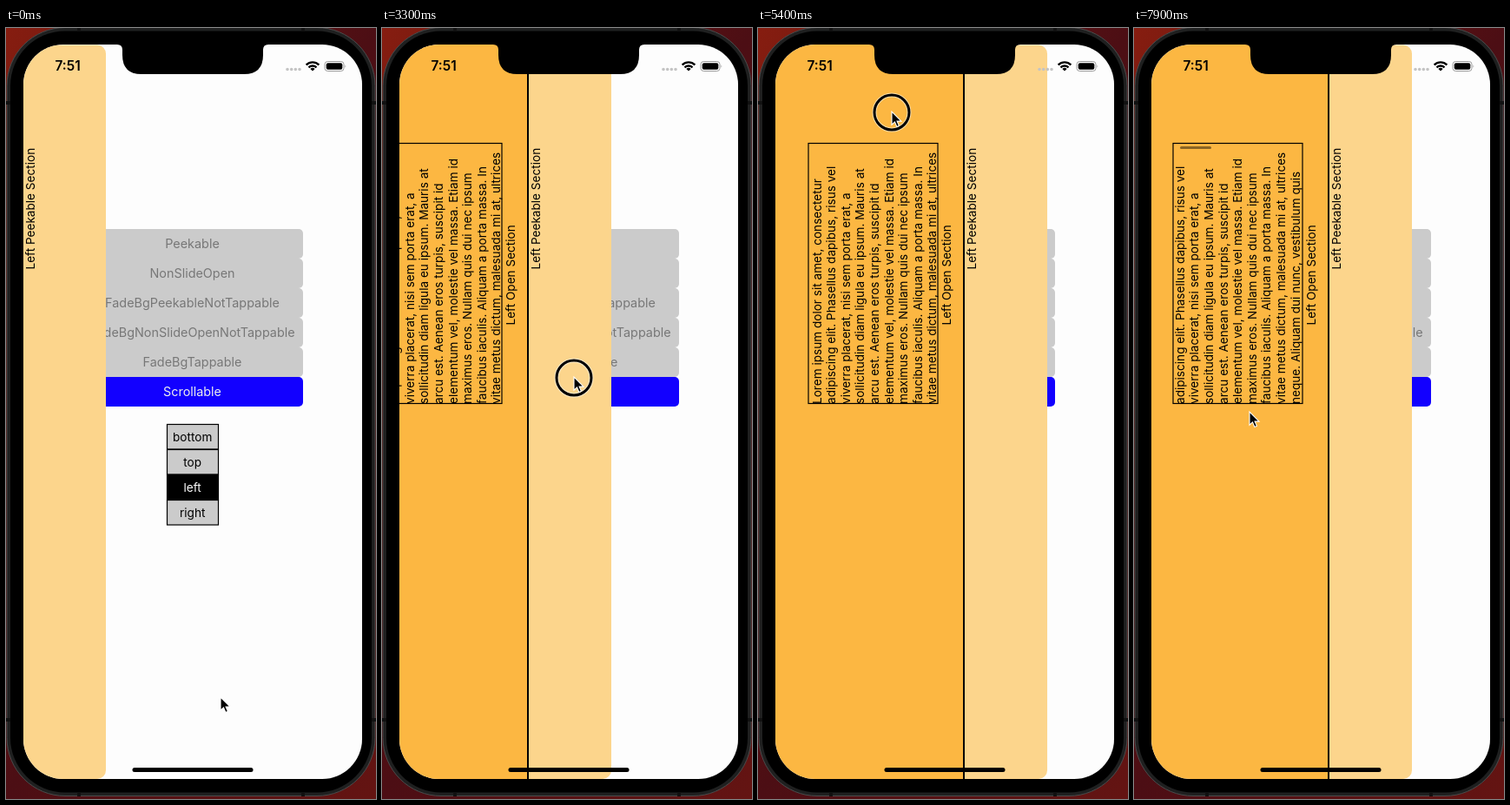
Write an HTML page that moves like this. It is 426 px wide and 886 px high and loops after 8 s.

```html
<!DOCTYPE html>
<html lang="en">
<head>
<meta charset="utf-8">
<title>Left peekable drawer</title>
<style>
  html, body { margin: 0; width: 100%; height: 100%; overflow: hidden; background: #4a0d10; }
  svg { display: block; width: 100%; height: 100%; }
  text { font-family: Inter, "Open Sans", sans-serif; font-size: 13.6px; }
  .mid { text-anchor: middle; }
  .row { font-size: 14.4px; }
  .clock { font-size: 15.4px; font-weight: 600; }
</style>
</head>
<body>
<svg viewBox="0 0 426 886">
  <defs>
    <linearGradient id="wall" x2="1" y2="1">
      <stop offset="0" stop-color="#861d10"/>
      <stop offset=".5" stop-color="#4c0e14"/>
      <stop offset="1" stop-color="#641412"/>
    </linearGradient>
    <clipPath id="screen"><rect x="20" y="19" width="390" height="844" rx="46"/></clipPath>
    <clipPath id="boxClip"><rect x="45" y="132" width="149.5" height="300"/></clipPath>
  </defs>

  <rect width="426" height="886" fill="url(#wall)"/>
  <rect x="1" y="-.5" width="424" height="883" rx="67" fill="#1f2020" stroke="#4b4b4b"/>
  <rect x="5" y="3.5" width="416" height="875" rx="63"/>
  <path d="M0 86h5M421 86h5M0 795h5M421 795h5M84 0v4M342 0v4M84 878v5M342 878v5" stroke="#111" stroke-width="4"/>

  <g clip-path="url(#screen)">
    <rect x="20" y="19" width="390" height="844" fill="#fdfdfd"/>
    <g id="rows"></g>
    <g id="sides"></g>

    <g id="panel">
      <rect x="100" y="19.5" width="220" height="843.5" rx="10" fill="#fcd58c"/>
      <rect x="-200" y="19" width="424" height="844" fill="#fcb742"/>
      <path d="M224 19V863" stroke="#000" stroke-width="2"/>
      <text transform="translate(237.5 277.5) rotate(-90)">Left Peekable Section</text>
      <text transform="translate(208.5 341.5) rotate(-90)">Left Open Section</text>
      <g clip-path="url(#boxClip)">
        <g id="lines"></g>
        <path id="bar" d="M54.5 137.5h33" stroke="#000" stroke-opacity=".45" stroke-width="3" stroke-linecap="round"/>
      </g>
      <rect x="45" y="132.5" width="149" height="299" fill="none" stroke="#000" stroke-width="1.2"/>
    </g>

    <path d="M128 18v1q6 0 6 6v6q0 22 22 22h118q22 0 22-22v-6q0-6 6-6v-1z"/>
    <rect x="145.5" y="850" width="139" height="5" rx="2.5"/>
    <text class="clock" x="56.5" y="49.3">7:51</text>
    <path d="M324 47.5h15" stroke="#c4c4c4" stroke-width="3.6" stroke-linecap="round" stroke-dasharray=".01 4.66"/>
    <g fill="none" stroke="#000" stroke-width="2.3">
      <path d="M345.6 42.4a10.6 10.6 0 0 1 14.8 0"/>
      <path d="M348.5 45.3a6.5 6.5 0 0 1 9 0"/>
    </g>
    <path d="M353 49.6l-2.6-2.6a3.7 3.7 0 0 1 5.2 0z"/>
    <rect x="367" y="38.5" width="22" height="11" rx="3.3" fill="none" stroke="#9b9b9b"/>
    <rect x="368.7" y="40.2" width="18.6" height="7.6" rx="2"/>
    <path d="M390.5 42.3q1.6 1.7 0 3.4z" fill="#9b9b9b"/>
  </g>

  <g id="cursor">
    <g id="ring" fill="none">
      <circle cy="1" r="20" stroke="#fff" stroke-opacity=".55" stroke-width="5"/>
      <circle cy="1" r="20" stroke="#000" stroke-width="3"/>
    </g>
    <path d="M0 0V15.2l3.5-3.3 2.4 5.5 2.5-1.1-2.3-5.2h4.9z" stroke="#fff" stroke-width="1.1"/>
  </g>
</svg>

<script>
const LOOP = 8000, STEP = 100;
const GLIDE = 800, REST = 100;
const PEEK = 115, OPEN = 320;
const $ = id => document.getElementById(id);

function add(parent, tag, attrs, text = '') {
  const node = document.createElementNS('http://www.w3.org/2000/svg', tag);
  for (const key in attrs) node.setAttribute(key, attrs[key]);
  node.textContent = text;
  $(parent).append(node);
}

['Peekable', 'NonSlideOpen', 'FadeBgPeekableNotTappable', 'FadeBgNonSlideOpenNotTappable',
 'FadeBgTappable', 'Scrollable'].forEach((label, i) => {
  const y = 231 + i * 34, active = label === 'Scrollable';
  add('rows', 'rect', { x: 87, y, width: 255, height: 34, rx: 5, fill: active ? '#1200ff' : '#cbcbcb' });
  add('rows', 'text', { x: 214.5, y: y + 22.2, class: 'mid row', fill: active ? '#eee' : '#777' }, label);
});

['bottom', 'top', 'left', 'right'].forEach((label, i) => {
  const y = 455.5 + i * 29, active = label === 'left';
  add('sides', 'rect', { x: 185.5, y, width: 59, height: 28.5, fill: active ? '#000' : '#cbcbcb', stroke: '#000', 'stroke-width': 1.2 });
  add('sides', 'text', { x: 214.7, y: y + 19, class: 'mid', fill: active ? '#fff' : '#000' }, label);
});

['Lorem ipsum dolor sit amet, consectetur',
 'adipiscing elit. Phasellus dapibus, risus vel',
 'viverra placerat, nisi sem porta erat, a',
 'sollicitudin diam ligula eu ipsum. Mauris at',
 'arcu est. Aenean eros turpis, suscipit id',
 'elementum vel, molestie vel massa. Etiam id',
 'maximus eros. Nullam quis dui nec ipsum',
 'faucibus iaculis. Aliquam a porta massa. In',
 'vitae metus dictum, malesuada mi at, ultrices',
 'neque. Aliquam dui nunc, vestibulum quis',
 'lacus vel, tempus luctus sem. Donec in'].forEach((line, i) =>
  add('lines', 'text', { transform: `translate(${59.6 + i * 16.6} 432) rotate(-90)` }, line));

// The hand makes four drags; everything else follows from them.
const home = { x: 247, y: 769 }, away = { x: 133, y: 441 };
const opening = { down: 600, up: 1300, from: { x: 57, y: 560 }, to: { x: 160, y: 527 } };
const pulling = { down: 2800, up: 3400, from: { x: 277, y: 404 }, to: { x: 221, y: 401 } };
const stretching = { down: 4400, up: 5500, from: { x: 112, y: 130 }, to: { x: 154, y: 96 } };
const scrolling = { down: 6400, up: 7200, from: { x: 158, y: 197 }, to: { x: 139.5, y: 199 } };
const drags = [opening, pulling, stretching, scrolling];

function progress(t, start, end) {
  const p = Math.min(1, Math.max(0, (t - start) / (end - start)));
  return p * p * (3 - 2 * p);
}

const between = (a, b, p) => ({ x: a.x + (b.x - a.x) * p, y: a.y + (b.y - a.y) * p });
const grip = (drag, t) => progress(t, drag.down, drag.up - REST);
const pull = (drag, t) => (drag.to.x - drag.from.x) * grip(drag, t);

function pointerAt(t) {
  const next = drags.findIndex(drag => t < drag.up);
  const drag = drags[next] || { down: LOOP, from: away };
  if (t >= drag.down) return between(drag.from, drag.to, grip(drag, t));
  const last = next < 0 ? scrolling : drags[next - 1] || { up: 0, to: home };
  const arrive = drag.down - REST;
  return between(last.to, drag.from, progress(t, Math.max(last.up, arrive - GLIDE), arrive));
}

// Past its open position the panel resists; once released it settles open.
function edgeAt(t) {
  const drag = [stretching, pulling, opening].find(d => t >= d.down);
  if (!drag) return PEEK;
  const offset = (drag === opening ? PEEK - OPEN : 0) + pull(drag, t);
  const held = offset > 0 ? offset * .31 : offset;
  return OPEN + held * Math.exp(-Math.max(0, t - drag.up) / 100);
}

const move = (id, x, y = 0) => $(id).setAttribute('transform', `translate(${x} ${y})`);

function draw(now) {
  const t = Math.floor(now % LOOP / STEP) * STEP;
  const pointer = pointerAt(t), shift = pull(scrolling, t);
  move('cursor', pointer.x, pointer.y);
  move('panel', edgeAt(t) - OPEN);
  move('lines', shift);
  move('bar', -(shift + 18.5) * .24);
  $('bar').style.opacity = progress(t, scrolling.down, scrolling.down + 200);
  $('ring').style.display = drags.some(d => t >= d.down && t < d.up) ? '' : 'none';
}

const start = performance.now();
function tick() {
  draw(performance.now() - start);
  requestAnimationFrame(tick);
}
tick();
</script>
</body>
</html>
```
